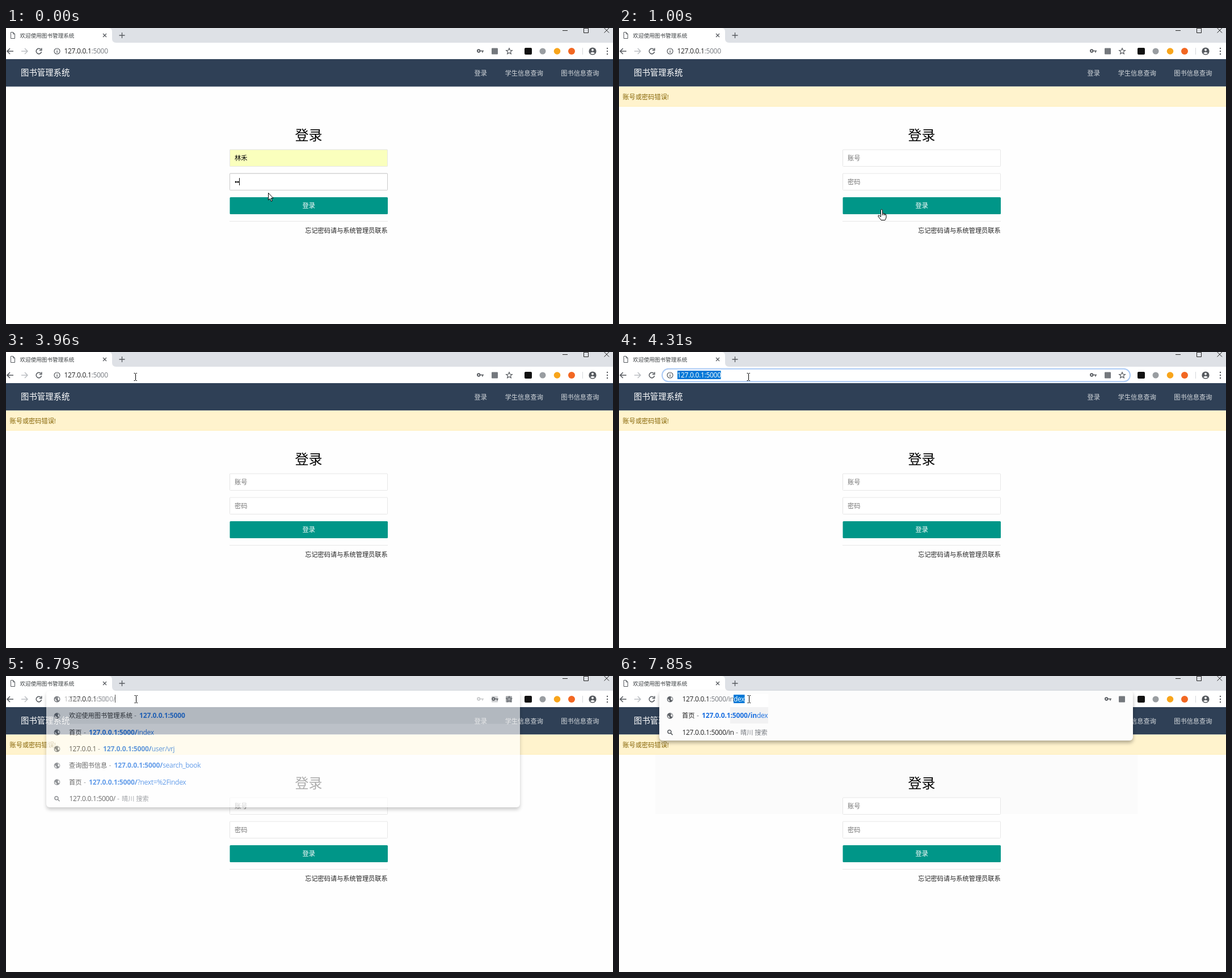
Animation, 1070 px wide and 523 px high, one loop 8 s. Source, as an HTML page:

```html
<!DOCTYPE html>
<html lang="zh-CN">
<head>
<meta charset="utf-8">
<title>欢迎使用图书管理系统</title>
<style>
html, body { margin: 0; width: 100%; height: 100%; overflow: hidden; background: #fefefe; }
svg { display: block; }
text { font: 11.2px "Open Sans", "Noto Sans CJK SC", "Noto Sans CJK", sans-serif; fill: #222; white-space: pre; }
.latin { font-size: 12px; letter-spacing: -.3px; }
.bold { font-weight: 700; letter-spacing: -.1px; }
.gray { fill: #777b80; }
.link { fill: #1a6fe0; }
.nav { fill: #d5d9dd; }
.hint { fill: #757575; }
.line { fill: none; stroke: #55595e; stroke-width: 1.5; }
.thin { fill: none; stroke: #222; }
.field { fill: #fff; stroke: #e6e6e6; }
.dark { stroke: #cacaca; }
.panel { fill: #fff; filter: drop-shadow(0 4px 3px rgba(0, 0, 0, .3)); }
.caret { stroke: #000; }
.select { fill: #0078d7; }
</style>
</head>
<body>
<svg width="1070" height="523" viewBox="0 0 1070 523">
  <defs>
    <g id="key"><circle cx="3.2" cy="0" r="2.2" fill="none" stroke="#55595e" stroke-width="1.9"/><path d="M5 0H12M10 0V3" class="line" stroke-width="2"/></g>
    <rect id="badge" y="-5.5" width="11" height="11" rx="1" fill="#74787d"/>
    <g id="globe"><circle r="5.3" fill="#5f6368"/><path d="M-4-1L-1 2V4.2Q-4 3-4-1ZM0-4L3-3 1-1 2 1 4 2Q5-2 2.5-4Z" fill="#fff"/></g>
    <g id="search"><circle cx="-1" cy="-1" r="3" class="line"/><path d="M1 1L4.5 4.5" class="line"/></g>
  </defs>

  <!-- tab strip -->
  <rect width="1070" height="26" fill="#dee1e6"/>
  <path d="M0 0H181Q187 0 187 7V19Q187 26 194 26H0Z" fill="#fff"/>
  <path data-on="0 850,1000 8000" d="M8.5 7.5H12.5L15.5 10.5V18.5H8.5ZM12.5 7.5V10.5H15.5" class="line" style="stroke-width:1"/>
  <path data-on="850 1000" d="M12 8A5 5 0 1 1 7 13" class="line"/>
  <text x="24.5" y="16.6" style="font-size:9.6px;fill:#3c4043">欢迎使用图书管理系统</text>
  <path d="M171 10L177 16M177 10L171 16M199.500 13H209.500M204.500 8V18" class="line" style="stroke-width:1.3"/>
  <path d="M981 4.500H990M1018.500 .5H1026.500V8.500H1018.500ZM1054.500 0L1063 8.500M1063 0L1054.500 8.500" class="thin"/>

  <!-- toolbar -->
  <rect y="26" width="1070" height="29" fill="#fff"/>
  <path d="M13 41H2.500M7 36L2 41L7 46" class="line"/>
  <path d="M27 41H37.500M33 36L38 41L33 46" class="line" style="stroke:#bcbfc3"/>
  <path data-on="0 850,1000 8000" d="M61.500 38A4.700 4.700 0 1 0 62.500 42M62.800 35.500V39.500H58.800" class="line"/>
  <path data-on="850 1000" d="M54 37L62 45M62 37L54 45" class="line"/>
  <rect data-on="4250 6730" x="76" y="29.800" width="825" height="22.400" rx="11.200" fill="#fff" stroke="#a9c9f5" stroke-width="2"/>
  <circle cx="90" cy="41" r="5" class="line" style="stroke-width:1.200"/>
  <path d="M90 40V44M90 37.800V39" class="line" style="stroke-width:1.300"/>
  <text x="102.500" y="45" class="latin" data-on="0 4250,5670 8000">127.0.0.1<tspan class="gray">:5000</tspan></text>
  <g data-on="4250 5670">
    <rect x="103" y="33" width="76.500" height="15" class="select"/>
    <text x="102.500" y="45" class="latin" style="fill:#fff">127.0.0.1:5000</text>
  </g>
  <path data-on="5670 6240" d="M179.500 33V48" class="caret"/>
  <use href="#key" x="830" y="40.500"/>
  <use href="#badge" x="856" y="41"/>
  <path d="M887 35.800L888.500 39.300 892.300 39.600 889.400 42 890.300 45.800 887 43.800 883.700 45.800 884.600 42 881.700 39.600 885.500 39.300Z" class="line" style="stroke-width:1.200"/>
  <rect x="914" y="35" width="13" height="12" rx="2" fill="#111"/>
  <circle cx="946" cy="41" r="5.500" fill="#999da1"/>
  <circle cx="971.500" cy="41" r="5.800" fill="#f8a51b"/>
  <circle cx="997" cy="41" r="6" fill="#f26722"/>
  <path d="M1016.500 35V47" stroke="#d5d7da"/>
  <circle cx="1034" cy="41" r="6.600" fill="#55595e"/>
  <circle cx="1034" cy="38.800" r="2" fill="#fff"/>
  <path d="M1030 44.500Q1034 40.500 1038 44.500Q1034 47.500 1030 44.500Z" fill="#fff"/>
  <path d="M1060 36V36.010M1060 41V41.010M1060 46V46.010" class="line" style="stroke-width:2.400;stroke-linecap:round"/>

  <!-- page -->
  <rect y="55" width="1070" height="48.500" fill="#2f4056"/>
  <text x="26" y="84.300" style="font-size:14.400px;fill:#fff">图书管理系统</text>
  <text x="825.500" y="83.500" class="nav">登录</text>
  <text x="879.700" y="83.500" class="nav">学生信息查询</text>
  <text x="978.300" y="83.500" class="nav">图书信息查询</text>
  <g data-on="900 8000">
    <rect y="103.500" width="1070" height="35.500" fill="#fff3cd"/>
    <path d="M0 138.500H1070" stroke="#ffeeba"/>
    <text x="6.500" y="125.700" style="fill:#856404">账号或密码错误!</text>
  </g>
  <rect data-on="7600 8000" x="64" y="139" width="850" height="105" fill="#fbfbfb"/>
  <text x="533.500" y="198" text-anchor="middle" style="font-size:24px;font-weight:300;fill:#000">登录</text>
  <rect x="394.500" y="215" width="278" height="29.500" rx="1" class="field"/>
  <rect x="394.500" y="257" width="278" height="29.500" rx="1" class="field"/>
  <g data-on="0 900">
    <rect x="394.500" y="215" width="278" height="29.500" rx="1" class="field" style="fill:#faffbd"/>
    <text x="403" y="234.300" style="fill:#000">林禾</text>
    <circle cx="405.200" cy="272" r="1.600"/>
    <circle cx="409" cy="272" r="1.600"/>
    <circle cx="412.800" cy="272" r="1.600" data-on="150 900"/>
  </g>
  <rect data-on="0 670" x="394.500" y="257" width="278" height="29.500" rx="1" class="field dark" style="fill:none"/>
  <path data-on="0 150" d="M411.500 265V278" class="caret"/>
  <path data-on="150 670" d="M415.500 265V278" class="caret"/>
  <g data-on="900 8000">
    <text x="403" y="234" class="hint">账号</text>
    <text x="403" y="276" class="hint">密码</text>
  </g>
  <rect data-on="1980 2650" x="394.500" y="215" width="278" height="29.500" rx="1" class="field dark" style="fill:none"/>
  <rect x="394.500" y="299" width="278.500" height="30" rx="1.500" fill="#009688"/>
  <text x="533.700" y="318.300" text-anchor="middle" style="fill:#fff">登录</text>
  <path d="M394 341.500H673" stroke="#e6e6e6"/>
  <text x="672.700" y="362" text-anchor="end">忘记密码请与系统管理员联系</text>
  <g id="tip">
    <rect x="472.500" y="244.500" width="77" height="17" fill="#fff" stroke="#767676"/>
    <text x="478" y="256.500" style="font-size:9.600px;fill:#575757">请填写此字段。</text>
  </g>

  <g id="drop"></g>
  <g id="cursor">
    <path id="arrow" d="M.5 .5V13L3.400 10.400 5.400 15.300 7.400 14.400 5.300 9.700H9.200Z" fill="#fff" stroke="#000"/>
    <path id="hand" d="M-1.500 .5Q0-1.500 1.500 .5V6.500L6 7.500Q8 8 8 10V14L6 18.500H-1L-6 12Q-6.500 9-4 10.500L-1.500 12.500ZM1.500 6.500V10M4 7.500V10M6 8V10" fill="#fff" stroke="#000"/>
    <path id="beam" d="M-2.500-6.500H-.5L.5-5.500 1.500-6.500H3M-2.500 6.500H-.5L.5 5.500 1.500 6.500H3M.5-5.500V5.500" fill="none" stroke="#000"/>
  </g>
</svg>
<script>
const $ = id => document.getElementById(id);
const HOST = '127.0.0.1:5000/';
const rowY = i => 41 + 29.3 * i;

const text = (x, i, s, cls = '') => `<text x="${x}" y="${rowY(i) + 4}" class="${cls}">${s}</text>`;
const icon = (id, i) => `<use href="#${id}" x="90" y="${rowY(i)}"/>`;
const address = (tail = '') => text(111.5, 0, `127.0.0.1<tspan class="gray">:5000/${tail}</tspan>`, 'latin');

// One suggestion: page title, then its address with the typed part in bold
const page = (i, title, x, strong, rest = '') => icon('globe', i)
  + text(111, i, title, /\d/.test(title) ? 'latin' : '')
  + text(x - 9, i, '-', 'latin gray')
  + text(x, i, `<tspan class="bold">${strong}</tspan>${rest}`, 'latin link');

const search = (i, query, x) => icon('search', i) + text(111.5, i, query, 'latin')
  + text(x, i, '-', 'latin gray') + text(x + 8, i, '晴川 搜索', 'gray');

const panel = (on, height, fill, body) => `<g data-on="${on}">
  <rect x="71" y="26" width="835" height="${height}" rx="6" class="panel" style="fill:${fill}"/>${body}
  ${icon('globe', 0)}<use href="#key" x="856" y="40.5"/><use href="#badge" x="881" y="41"/></g>`;

// Address completed to "index", with the untyped rest selected
const completed = (on, typed, x, extra = '') => {
  const rest = 'index'.slice(typed.length);
  return panel(on, 88, '#fcfcfc', extra + address(typed)
    + `<rect x="${x}" y="33" width="${221.5 - x}" height="15" class="select"/>`
    + `<text x="${x}" y="45" class="latin" style="fill:#fff">${rest}</text>`
    + page(1, '首页', 146, HOST + typed, rest)
    + search(2, HOST + typed, x + 4));
};

$('drop').innerHTML = panel('6730 7600', 206, '#fff',
  '<rect x="71" y="55" width="835" height="29.5" fill="#f1f1f1"/>' + address()
  + '<path data-on="6730 7330" d="M192.5 33V47" class="caret"/>'
  + page(1, '欢迎使用图书管理系统', 235, HOST.slice(0, -1))
  + page(2, '首页', 146, HOST, 'index')
  + page(3, '127.0.0.1', 171, HOST, 'user/vrj')
  + page(4, '查询图书信息', 190.5, HOST, 'search_book')
  + page(5, '首页', 146, HOST, '?next=%2Findex')
  + search(6, HOST, 196))
  + completed('7600 7850', 'i', 195.5)
  + completed('7850 8000', 'in', 202,
    '<rect x="196" y="32" width="67" height="23" fill="#fff"/><rect x="196" y="55" width="67" height="29" fill="#f2f2f3"/>');

// Pointer: time, x, y
const path = [[0, 462, 291], [440, 462, 291], [670, 463, 321], [1860, 463, 321], [2030, 472, 228],
  [2380, 472, 228], [2590, 314, 108], [2780, 210, 66], [2990, 252, 109], [3050, 252, 109],
  [3170, 406, 256], [3340, 406, 256], [3480, 215, 163], [3730, 215, 163], [3960, 228, 44],
  [4680, 228, 44], [4800, 229, 41], [8000, 229, 41]];

const clamp = v => Math.max(0, Math.min(1, v));
const ramp = (t, a, b) => clamp((t - a) / (b - a));
const inside = (v, a, b) => v >= a && v < b;

function pointer(t) {
  const i = path.findIndex(p => p[0] > t);
  const [a, b] = [path[i - 1], path[i]];
  const k = ramp(t, a[0], b[0]);
  return [1, 2].map(n => Math.round(a[n] + (b[n] - a[n]) * k));
}

function shape(x, y) {
  if (inside(y, 28, 55)) return 'beam';
  if (!inside(x, 395, 673)) return 'arrow';
  if (inside(y, 299, 329)) return 'hand';
  return inside(y, 215, 245) || inside(y, 257, 287) ? 'beam' : 'arrow';
}

const timed = [...document.querySelectorAll('[data-on]')].map(el =>
  [el, el.dataset.on.split(',').map(s => s.split(' ').map(Number))]);

function draw() {
  const t = performance.now() % 8000;
  for (const [el, spans] of timed)
    el.style.display = spans.some(([a, b]) => inside(t, a, b)) ? '' : 'none';
  $('tip').style.opacity = ramp(t, 2180, 2320) * (1 - ramp(t, 2440, 2612));
  $('drop').style.opacity = .5 + .5 * ramp(t, 6730, 6900);
  const [x, y] = pointer(t);
  $('cursor').setAttribute('transform', `translate(${x} ${y})`);
  for (const id of ['arrow', 'hand', 'beam'])
    $(id).style.display = id === shape(x, y) ? '' : 'none';
  requestAnimationFrame(draw);
}
draw();
</script>
</body>
</html>
```
